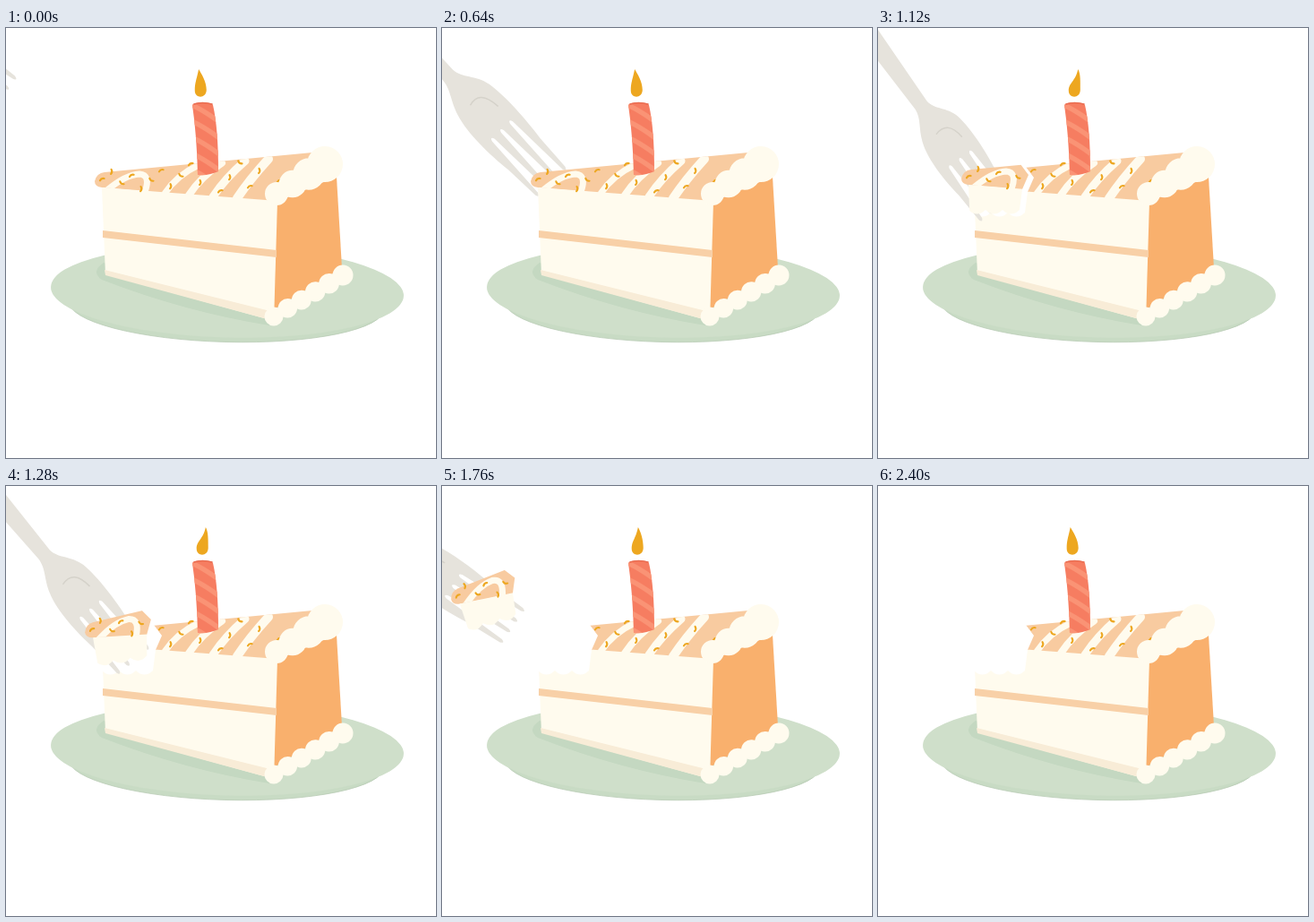
These frames come from a looping animation (480 by 480 pixels, 2560 ms). An HTML page with a canvas:

```html
<!DOCTYPE html>
<html lang="en">
<head>
<meta charset="utf-8">
<title>Birthday cake</title>
<style>
html, body { margin: 0; width: 100%; height: 100%; overflow: hidden; background: #fff; }
canvas { display: block; width: 100vmin; height: 100vmin; }
</style>
</head>
<body>
<canvas id="stage" width="480" height="480"></canvas>
<script>
const ctx = document.getElementById('stage').getContext('2d');
const STEP = 160, STEPS = 16, CUT = 6, LIFT = 7;
const CREAM = '#fffbee', PEACH = '#f8cba0', GOLD = '#eda720';

// Fork keys: step, x and y of the tips, angle in degrees.
const FORK = [[0, -1, 74, 36], [2, 65, 126, 37], [4, 123, 173, 46], [6, 133, 203, 54],
  [LIFT, 133, 203, 54], [8, 143, 196, 50], [9, 146, 189, 34], [15, -52, 93, 34]];

const mix = (a, b, u) => a + (b - a) * u;
const clamp = u => Math.min(1, Math.max(0, u));

function forkPose(k) {
  const i = Math.max(1, FORK.findIndex(key => key[0] >= k));
  const [from, ...a] = FORK[i - 1], [to, ...b] = FORK[i];
  return a.map((v, j) => mix(v, b[j], (k - from) / (to - from)));
}

function fill(path, color) {
  ctx.fillStyle = color;
  ctx.fill(path);
}

function stroke(path, color, width) {
  ctx.strokeStyle = color;
  ctx.lineWidth = width;
  ctx.lineCap = ctx.lineJoin = 'round';
  ctx.stroke(path);
}

function place(x, y, degrees, draw) {
  ctx.save();
  ctx.translate(x, y);
  ctx.rotate(degrees * Math.PI / 180);
  draw();
  ctx.restore();
}

function clipped(path, draw, rule = 'nonzero') {
  ctx.save();
  ctx.clip(path, rule);
  draw();
  ctx.restore();
}

function disc(x, y, rx, ry) {
  const path = new Path2D();
  path.ellipse(x, y, rx, ry, .026, 0, 7);
  return path;
}

// A row of overlapping puffs from one end to the other.
function frosting(count, [x0, y0, r0], [x1, y1, r1]) {
  const path = new Path2D();
  for (let i = 0; i < count; i++) {
    const u = i / (count - 1), r = mix(r0, r1, u);
    path.addPath(disc(mix(x0, x1, u), mix(y0, y1, u), r, r));
  }
  return path;
}

const plate = disc(247, 294, 197, 51.5);
const foot = disc(246, 309.5, 176, 41);
const shadow = new Path2D('M109 262 Q94 272 107 281 Q200 317 294 332 L304 310 Z');
const topFace = new Path2D('M107 178 Q99 177 99 171 Q101 162 110 161 L342 139 L352 152 L300 195 Z');
const frontFace = new Path2D('M107 178 L303 193 L299 327 L111 275 Z');
const frontBase = new Path2D('M110 270 L299 317 L299 327 L111 276 Z');
const filling = new Path2D('M108 226 L302 248 L302 256 L108 234 Z');
const sideFace = new Path2D('M302 194 L369 166 L375 268 L299 314 Z');
const topFrosting = frosting(4, [302, 185, 13], [356, 152, 20]);
const baseFrosting = frosting(6, [299, 322, 10.5], [376, 276, 11.5]);
const drizzleLoop = new Path2D('M113 181 Q133 164 149 163 Q162 164 155 183');
const cutEdge = 'M85 145 H163 L165 155 L174 167 L167 183 L164 206 ' + 'q-9.5 9 -19 0 '.repeat(3) + 'V209 H85 Z';
const bitten = new Path2D(cutEdge);
const remaining = new Path2D('M0 0 H480 V480 H0 Z ' + cutEdge);
const candle = new Path2D('M208 86 Q210 83 219 83 Q229 83 231 86 Q237 112 237 160 Q227 165 214 164 Q213 120 208 86 Z');
const sprinkle = new Path2D('M-2.6 .7 Q0 -1.4 2.6 .7');

function drawPlate() {
  fill(foot, '#c8dbc4');
  stroke(foot, '#b9ccb5', .8);
  fill(plate, '#cfdfca');
  fill(shadow, '#c4d8c1');
}

function drawDrizzle() {
  stroke(drizzleLoop, CREAM, 7);
  for (let i = 0; i < 4; i++) {
    const x = 177 + 27 * i, y = 185 + 1.7 * i;
    stroke(new Path2D(`M${x} ${y} q14 -21 ${38 - i} ${-32 - 4 * i}`), CREAM, 7 + i);
  }
}

// Golden-ratio scatter over the sloping top.
function drawSprinkles() {
  for (let i = 0; i < 19; i++) {
    const dx = i * 11, depth = (i * .618 + .45) % 1;
    place(107 + dx, mix(160 - dx * .09, 179 + dx * .06, depth), i * 120 - 25, () => stroke(sprinkle, GOLD, 2.1));
  }
}

function drawCake() {
  fill(topFace, PEACH);
  clipped(topFace, drawDrizzle);
  fill(sideFace, '#f9b06d');
  fill(frontFace, CREAM);
  fill(filling, '#f8d0a7');
  fill(frontBase, '#f8ecd7');
  drawSprinkles();
  fill(topFrosting, CREAM);
  fill(baseFrosting, CREAM);
}

function drawCandle() {
  fill(candle, '#f67d61');
  clipped(candle, () => {
    for (let y = 84; y < 175; y += 18) {
      stroke(new Path2D(`M203 ${y} Q222 ${y + 8} 242 ${y + 24}`), '#fa9375', 5.5);
    }
  });
  stroke(new Path2D('M210 85 Q219 82 230 85'), '#e96c50', 1.6);
}

function drawFlame(k) {
  const turn = (k - 2) / STEPS * 2 * Math.PI;
  const lean = 1 + 4 * Math.cos(3 * turn) - 1.5 * Math.cos(turn);
  place(218 + lean * .25, 77, 0, () => fill(new Path2D(
    `M${lean * .75} -31 C${lean * .75 + 3} -26 6.5 -17 6.5 -8 C6.5 2 -6.5 2 -6.5 -7 ` +
    `C-6.5 -16 ${lean * .75 - 3} -17 ${lean * .75} -31 Z`), GOLD));
}

// Local origin is the middle of the tips; the handle runs towards negative x.
function forkShape() {
  let d = 'M-340 -12 L-168 -8 C-153 -9 -147 -22 -128 -26 C-105 -30 -70 -28 -45 -25 L-2 -23 ';
  for (let y = -21; y <= 21; y += 14) {
    d += `L-3 ${y - 2} Q3 ${y} -3 ${y + 2} `;
    const gap = y + 7;
    if (y < 21) d += `L-80 ${gap - 2} Q-86 ${gap} -80 ${gap + 2} `;
  }
  return new Path2D(d + 'L-45 25 C-70 28 -105 30 -128 23 C-147 17 -153 9 -168 8 L-340 12 Z');
}
const fork = forkShape();

function drawFork(k) {
  const [x, y, angle] = forkPose(k);
  place(x, y, angle, () => {
    ctx.scale(1 - Math.max(0, angle - 46) * .0175, 1); // foreshortened when steep
    fill(fork, '#e6e3dc');
    stroke(new Path2D('M-126 5 Q-132 -14 -104 -16'), '#d5d2ca', 1.5);
  });
}

// The bite rides on the fork, sliding back and tilting as it is lifted.
function drawBite(k) {
  const [x, y] = forkPose(k), lift = clamp((k - LIFT) / 2);
  place(x - mix(40, 70, lift), y - mix(36, 31, lift), -16 * lift, () => {
    ctx.translate(-99, -170);
    clipped(bitten, drawCake);
  });
}

function draw(k) {
  ctx.clearRect(0, 0, 480, 480);
  drawPlate();
  if (k < CUT) {
    drawFork(k);
    drawCake();
  } else {
    clipped(remaining, drawCake, 'evenodd');
    drawFork(k);
    drawBite(k);
  }
  drawCandle();
  drawFlame(k);
}

const start = performance.now();
function tick() {
  draw(Math.floor((performance.now() - start) / STEP) % STEPS);
  requestAnimationFrame(tick);
}
tick();
</script>
</body>
</html>
```
